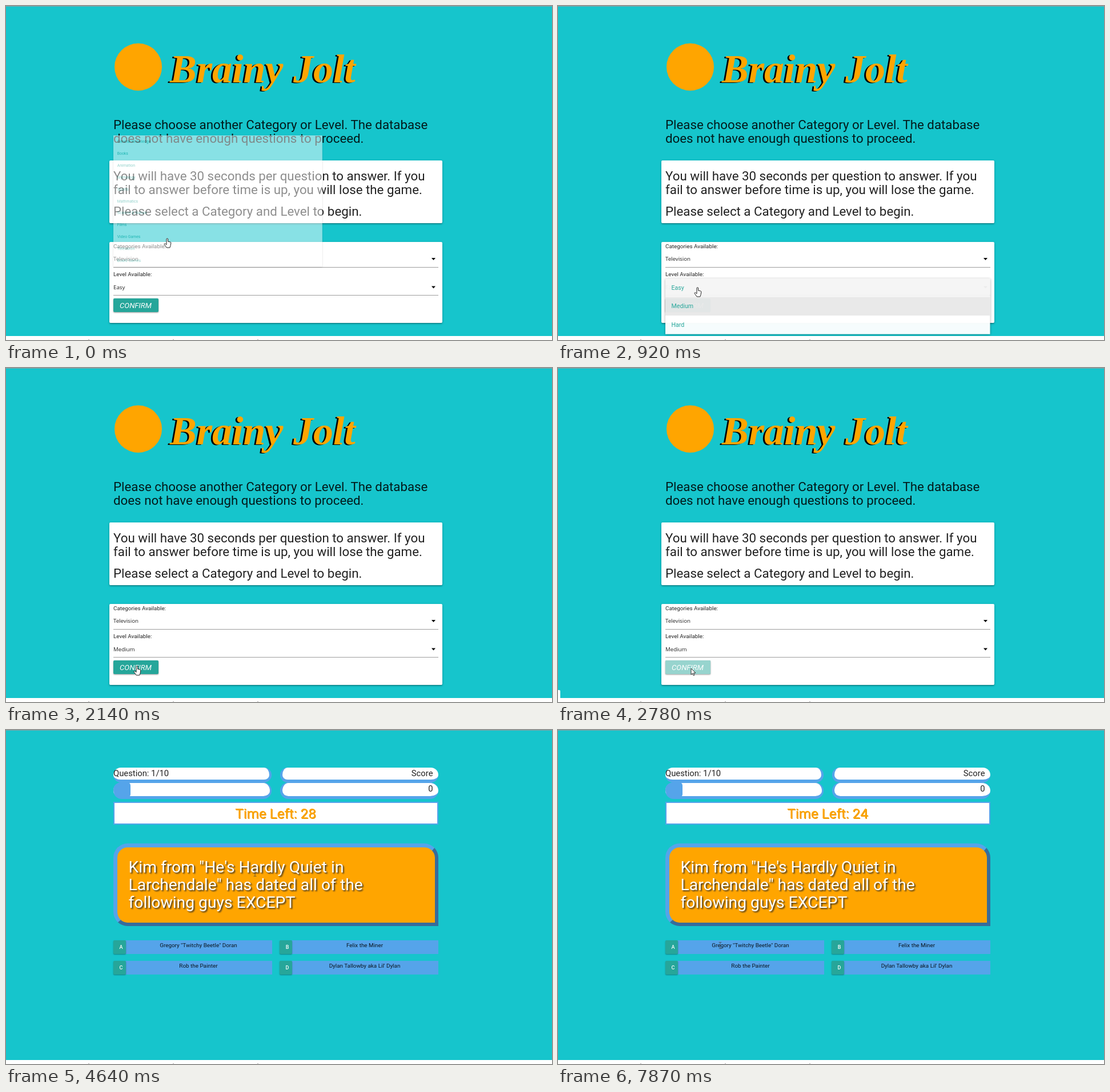
Animation, 956 px wide and 586 px high, one loop 8 s. Source, as an HTML page:

```html
<!DOCTYPE html>
<html lang="en">
<head>
<meta charset="utf-8">
<title>Quiz</title>
<style>
  html, body { margin: 0; width: 100%; height: 100%; overflow: hidden; background: #16c5cc; }
  .layer, .layer > * { position: absolute; box-sizing: border-box; }
  .layer, .layer > svg { left: 0; top: 0; width: 956px; height: 586px; }
  .card { left: 181px; width: 583px; background: #fff; border-radius: 2px;
    box-shadow: 0 2px 2px rgba(0,0,0,.14), 0 2px 1px -1px rgba(0,0,0,.12), 0 1px 4px rgba(0,0,0,.2); }
  .pill { width: 277px; background: #fff; border: 0 solid #55a4ea; border-radius: 15px; }
  .left { left: 188px; border-width: 0 4px 5px 0; }
  .right { left: 480px; border-width: 0 0 5px 4px; }
  .progress { left: 188px; top: 92px; width: 30px; height: 26px; background: #55a4ea; border-radius: 15px 6px 6px 15px; }
  .timer { left: 188px; top: 126px; width: 569px; height: 40px; background: #fff; border: 2px solid #55a4ea; }
  .question { left: 188px; top: 199px; width: 569px; height: 145px; background: #ffa500;
    border: 6px solid; border-color: #55a4ea #386c9a #386c9a #55a4ea; border-width: 7px 6px 6px 7px;
    border-radius: 25px 25px 0 25px; }
  .answer { width: 257px; height: 24px; background: #55a4ea; }
  .key { width: 22px; height: 24px; background: #26a69a; border-radius: 2px; box-shadow: 0 1px 2px rgba(0,0,0,.35); }
  text { font-family: Roboto, sans-serif; fill: rgba(0,0,0,.87); white-space: pre; }
  .heading { font-size: 22.3px; }
  .label { font-size: 9.9px; }
  .value { font: 9.7px "Open Sans", sans-serif; }
  .stat { font-size: 14.8px; }
  .end { text-anchor: end; }
  .mid { text-anchor: middle; }
  .item { font-size: 10.65px; fill: #26a69a; }
  .letter { font-size: 9px; font-weight: 500; fill: #fff; }
  .confirm { font-size: 13.2px; font-style: italic; fill: #fff; }
  .brand { font: italic bold 70px "Liberation Serif", serif; fill: #ffa500; filter: drop-shadow(-3px 1px 0 #000); }
  .clock { font-size: 24.2px; fill: #ffa500; filter: drop-shadow(1px 1px 0 #e89600); }
  .ask { font-size: 28.3px; filter: drop-shadow(2px 2px 1px rgba(40,40,40,.85)); }
  .ask text { fill: #fff; }
  .menu { filter: drop-shadow(0 1px 2px rgba(0,0,0,.35)); }
</style>
</head>
<body>
<div class="layer" id="setup">
  <div class="card" style="top:271px;height:110px"></div>
  <div class="card" style="top:414px;height:142px"></div>
  <svg>
    <circle cx="231.5" cy="107" r="41.5" fill="#ffa500"/>
    <text class="brand" x="287" y="134">Brainy Jolt</text>
    <g class="heading">
      <text x="188" y="216">Please choose another Category or Level. The database</text>
      <text x="188" y="240">does not have enough questions to proceed.</text>
      <text x="188" y="306">You will have 30 seconds per question to answer. If you</text>
      <text x="188" y="330">fail to answer before time is up, you will lose the game.</text>
      <text x="188" y="368">Please select a Category and Level to begin.</text>
    </g>
    <text class="label" x="188" y="424.5">Categories Available:</text>
    <text class="value" x="188" y="447">Television</text>
    <text class="label" x="188" y="474">Level Available:</text>
    <text class="value" x="188" y="497" id="level">Easy</text>
    <path d="M188 458.5H757M188 507.5H757" stroke="#9e9e9e"/>
    <path d="M745 442h7l-3.5 4zM745 491.5h7l-3.5 4z"/>
    <g style="filter:drop-shadow(0 1px 1px rgba(0,0,0,.4))">
      <rect x="188" y="513" width="79" height="24" rx="2" fill="#26a69a"/>
      <rect x="188" y="513" width="79" height="24" rx="2" fill="#fff" id="ripple"/>
    </g>
    <text class="confirm" x="199" y="529.5">CONFIRM</text>
    <g class="menu" id="categories"></g>
    <g class="menu" id="levels"></g>
  </svg>
</div>

<div class="layer" id="quiz">
  <div class="pill left" style="top:66px;height:26px"></div>
  <div class="pill right" style="top:66px;height:26px"></div>
  <div class="pill left" style="top:92px;height:29px;border-right-width:3px;border-top-width:1px"></div>
  <div class="pill right" style="top:92px;height:29px;border-top-width:1px"></div>
  <div class="progress"></div>
  <div class="timer"></div>
  <div class="question"></div>
  <svg>
    <text class="stat" x="188" y="81">Question: 1/10</text>
    <text class="stat end" x="747.5" y="81">Score</text>
    <text class="stat end" x="747.5" y="108">0</text>
    <text class="clock mid" x="472" y="155" id="clock"></text>
    <g class="ask">
      <text x="214.5" y="250">Kim from "He's Hardly Quiet in</text>
      <text x="214.5" y="281">Larchendale" has dated all of the</text>
      <text x="214.5" y="312">following guys EXCEPT</text>
    </g>
    <g id="answerText"></g>
  </svg>
</div>

<div class="layer">
  <svg>
    <path d="M0 .5H956" stroke="#7fa3a6"/>
    <rect y="579" width="956" height="7" fill="#fff"/>
    <path d="M144 585.5h2M292 585.5h2M440 585.5h2" stroke="#aaa"/>
    <path d="M0 565h2q2 0 2 2v12H0z" fill="#fff" id="status"/>
    <path id="cursor"/>
  </svg>
</div>

<script>
const $ = id => document.getElementById(id);
const LOOP = 8000, ROW = 32.6, REFRESH = LOOP / 60, QUIZ_START = 2900;

const text = (cls, x, y, str) => `<text class="${cls}" x="${x}" y="${y}">${str}</text>`;

function buildMenu(id, items, fills = []) {
  $(id).innerHTML = `<rect width="569" height="${ROW * items.length}" fill="#fff"/>` +
    items.map((item, i) =>
      (fills[i] ? `<rect y="${i * ROW}" width="569" height="${ROW}" fill="${fills[i]}"/>` : '') +
      text('item', 10.5, i * ROW + 19.8, item)).join('');
}
buildMenu('categories', ['General Knowledge', 'Books', 'Animation', 'Mythology', 'Sports', 'Mathmatics',
  'Science &amp; Nature', 'Films', 'Video Games', 'Television', 'Board Games']);
buildMenu('levels', ['Easy', 'Medium', 'Hard'], ['#f5f5f5', '#e9e9e9']);

['Gregory "Twitchy Beetle" Doran', 'Felix the Miner', 'Rob the Painter', "Dylan Tallowby aka Lil' Dylan"]
  .forEach((answer, i) => {
    const x = i % 2 ? 479 : 188, y = i < 2 ? 369 : 405;
    $('quiz').querySelector('svg').insertAdjacentHTML('beforebegin',
      `<div class="answer" style="left:${x + 21}px;top:${y}px"></div>
       <div class="key" style="left:${x}px;top:${y}px"></div>`);
    $('answerText').innerHTML += text('label mid', x + 149, y + 12.4, answer) +
      text('letter mid', x + 13.5, y + 14.6, 'ABCD'[i]);
  });

const shapes = {
  hand: { d: 'M-2-7c0-1.6 2.6-1.6 2.6 0v4.2l4 .8q1.4.4 1.2 2l-.8 4.5-1.2 3.5h-5.6l-4-5.6c-.6-1.2.8-2.2 2-1.2l1.8 1.6z', fill: '#fff', stroke: '#222' },
  arrow: { d: 'M0 0V11L2.6 8.6 4.3 12.6 6 11.8 4.4 8H8z', fill: '#fff', stroke: '#333' },
  beam: { d: 'M-2.5-5.5h5M0-5.5V5.5M-2.5 5.5h5', fill: 'none', stroke: 'rgba(60,60,60,.65)' }
};
// Pointer stops: time, x, y
const stops = [
  [0, 283, 416], [120, 287, 440], [240, 294, 473], [390, 245, 502], [1210, 241, 516], [1330, 230, 531],
  [2510, 233, 527], [3720, 240, 420], [3840, 247, 270], [3990, 261, 261], [4130, 300, 256],
  [4250, 350, 251], [4370, 400, 248], [4490, 431, 248], [4640, 436, 251], [4760, 460, 249],
  [4880, 500, 247], [5000, 527, 246], [5170, 587, 246], [5310, 631, 256], [5430, 560, 270],
  [5560, 480, 277], [5700, 444, 281], [5850, 431, 283], [6010, 501, 279], [6160, 560, 277],
  [6280, 592, 276], [6420, 610, 276], [6540, 618, 276], [6810, 520, 285], [6930, 434, 294],
  [7090, 327, 299], [7250, 297, 307], [7390, 288, 340], [7510, 284, 378]
];
const ticks = [3720, 4760, 5700, 6660, 7630];

const clamp = v => Math.min(1, Math.max(0, v));
const easeOut = (u, power) => 1 - (1 - clamp(u)) ** power;

function setAttrs(el, attrs) {
  for (const name in attrs) el.setAttribute(name, attrs[name]);
}
function placeMenu(id, y, grow, opacity) {
  setAttrs($(id), {
    transform: `translate(188 ${y}) scale(${0.3 + 0.7 * grow})`,
    opacity: opacity < 0.03 ? 0 : opacity
  });
}

function draw(t) {
  const inQuiz = t >= QUIZ_START;
  $('setup').style.display = inQuiz ? 'none' : '';
  $('quiz').style.display = inQuiz ? '' : 'none';

  // Menus repaint at the slow screen refresh
  const s = Math.floor((t + 27) / REFRESH) * REFRESH;
  const catsLeft = 1 - easeOut(0.133 + s / 600, 5);
  placeMenu('categories', 227, catsLeft, catsLeft);
  const opening = (s - 490) / 600, levelsLeft = 1 - easeOut((s - 1605) / 450, 5);
  placeMenu('levels', 478, easeOut(opening, 5) * levelsLeft, easeOut(opening, 2.5) * levelsLeft);

  $('level').textContent = t < 1720 ? 'Easy' : 'Medium';
  $('ripple').setAttribute('opacity', 0.52 * clamp((t - 2500) / 200));
  $('status').style.display = t >= 2390 && t < 3180 ? '' : 'none';
  $('clock').textContent = 'Time Left: ' + (29 - ticks.filter(tick => t >= tick).length);

  const [, x, y] = stops.findLast(stop => stop[0] <= t);
  const shape = t < 2510 ? 'hand' : t < 3840 ? 'arrow' : 'beam';
  setAttrs($('cursor'), { ...shapes[shape], transform: `translate(${x} ${y})` });
}

const start = performance.now();
function frame() {
  draw((performance.now() - start) % LOOP);
  requestAnimationFrame(frame);
}
frame();
</script>
</body>
</html>
```
